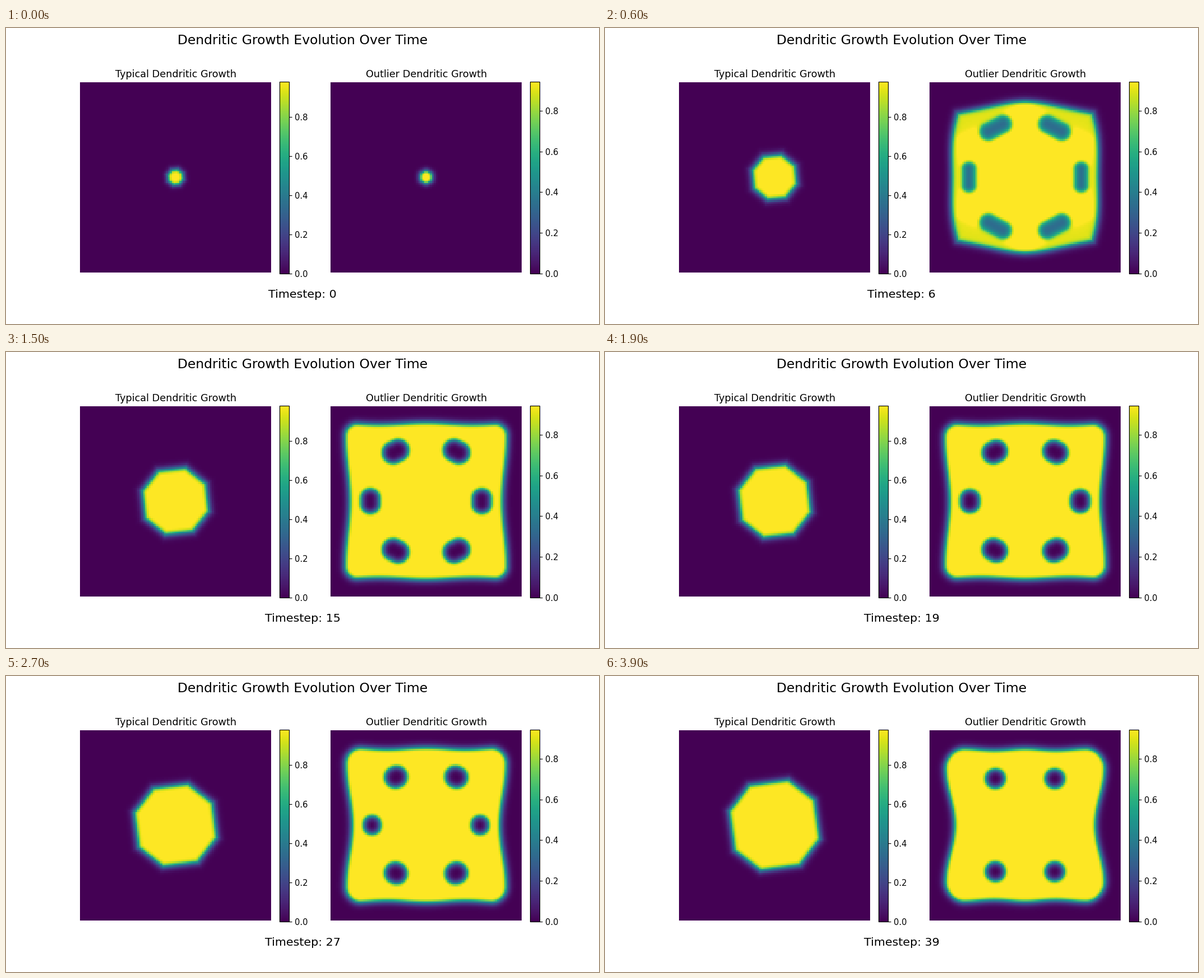
These frames come from a looping animation (1058 by 529 pixels, 4 s). A matplotlib script:

```python
import numpy as np
import matplotlib.pyplot as plt
from matplotlib.animation import FuncAnimation

STEPS = 40
CELLS = 100
CELL_PX = 3.4065

# Lengths below are in stage pixels, measured from the panel centre.
axis = (np.arange(CELLS) - (CELLS - 1) / 2) * CELL_PX
X, Y = np.meshgrid(axis, axis)
AX, AY = np.abs(X), np.abs(Y)
RADIUS = np.hypot(X, Y)
ANGLE = np.arctan2(Y, X)


def ramp(t, start, end):
    return min(max((t - start) / (end - start), 0), 1)


def solid(distance, width=4.6):
    """Phase profile: 1 inside the boundary, with a longer tail outside."""
    slope = np.where(distance > 0, 1.5 * width, width)
    return 0.5 * (1 - np.tanh(distance / slope))


def facets(first_deg, step_deg):
    """Largest extent along evenly turned facet normals."""
    turns = np.radians(np.arange(first_deg, first_deg + 360, step_deg))
    return np.max([X * np.cos(a) - Y * np.sin(a) for a in turns], axis=0)


def capsule(cx, cy, tilt_deg, size, stretch):
    """Distance to a rounded bar, in coordinates folded into one quadrant."""
    ux, uy = np.cos(np.radians(tilt_deg)), np.sin(np.radians(tilt_deg))
    dx, dy = AX - cx, AY - cy
    along = np.clip(dx * ux + dy * uy, -2 * stretch, 2 * stretch)
    return np.hypot(dx - along * ux, dy - along * uy) - size + stretch


def typical(t):
    lag = 0.9 * np.exp(-0.0575 * t) + 0.1 * np.exp(-0.5 * t)
    radius = 91.5 - 77.5 * lag
    a, b = -17, 28 + 0.115 * t
    gap = (b - a) / 2
    edges = [
        facets((a + b) / 2, 90) - radius * np.cos(np.radians(gap)),
        facets((a + b) / 2 + 45, 90) - radius * np.cos(np.radians(45 - gap)),
    ]
    return solid(np.maximum(*edges), 3.5 + 1.1 * ramp(t, 0, 4))


def slab(age):
    """Distance to a rounded square whose sides wave inwards as it ages."""
    corner = 20 + 14 * age
    waist = 137 - 11.5 * age ** 1.5
    shoulder = 144.5 - 2.5 * age
    swell = (1 - np.cos(np.pi * np.minimum(AY / (137 - corner), 1))) / 2
    half_w = waist + (shoulder - waist) * swell
    half_h = 139 - 4 * age + 1.7 * np.cos(2 * np.pi * X / (180 - 70 * age))
    qx, qy = AX - half_w + corner, AY - half_h + corner
    outside = np.hypot(np.maximum(qx, 0), np.maximum(qy, 0))
    return outside + np.minimum(np.maximum(qx, qy), 0) - corner


def holes(t, fill, age):
    stretch = 5 * np.exp((9 - t) / 8)
    diagonal = capsule(49 + 5.5 * fill - 1.5 * age, 84.5 + 5.5 * fill - 7 * age,
                       -28, 22 - 5.2 * age, stretch)
    side = capsule(98 + 3 * fill - 8 * age, 0,
                   90, 30 * np.sqrt(1 - age ** 3) - 11, stretch)
    return np.minimum(diagonal, side)


def outlier(t):
    burst = min(t, 4)                      # fast hexagonal growth
    fill = 1 - (1 - ramp(t, 4, 9)) ** 2    # then the square closes up
    age = ramp(t, 9, 39)                   # then it slowly relaxes

    outer = 10.5 + 27.75 * burst
    inner = 10.5 + 20 * burst + 50 * fill
    disc = RADIUS - outer * (1 - 0.029 * np.cos(6 * ANGLE))
    dent = 4 * inner / 90 * np.cos(3 * ANGLE) ** 2
    core = solid(facets(0, 60) + dent - inner, 5)

    shell = (1 - fill) * disc + fill * slab(age)
    ring = 1 - 0.065 * burst * (1 - fill)
    body = solid(shell, 3.5 + 1.1 * ramp(t, 0, 4)) * (ring + (1 - ring) * core)
    depth = 0.1 * ramp(t, 2, 4) + 0.9 * fill
    return body * (1 - depth * (1 - solid(-holes(t, fill, age))))


fig, axes = plt.subplots(1, 2, figsize=(10, 5), dpi=105.8)
fig.suptitle("Dendritic Growth Evolution Over Time", fontsize=16)

panels = []
for ax, name, growth, top in zip(axes, ("Typical", "Outlier"),
                                 (typical, outlier), (0.981, 0.944)):
    image = ax.imshow(growth(0), cmap="viridis", vmin=0, vmax=top)
    ax.set_title(f"{name} Dendritic Growth")
    ax.axis("off")
    fig.colorbar(image, ax=ax, fraction=0.046, pad=0.04)
    panels.append((image, growth))

label = fig.text(0.5, 0.089, "Timestep: 0", ha="center", fontsize=14)


def update(t):
    for image, growth in panels:
        image.set_data(growth(t))
    label.set_text(f"Timestep: {t}")
    return [image for image, _ in panels] + [label]


anim = FuncAnimation(fig, update, frames=STEPS, interval=100, repeat=True)
plt.show()
```
